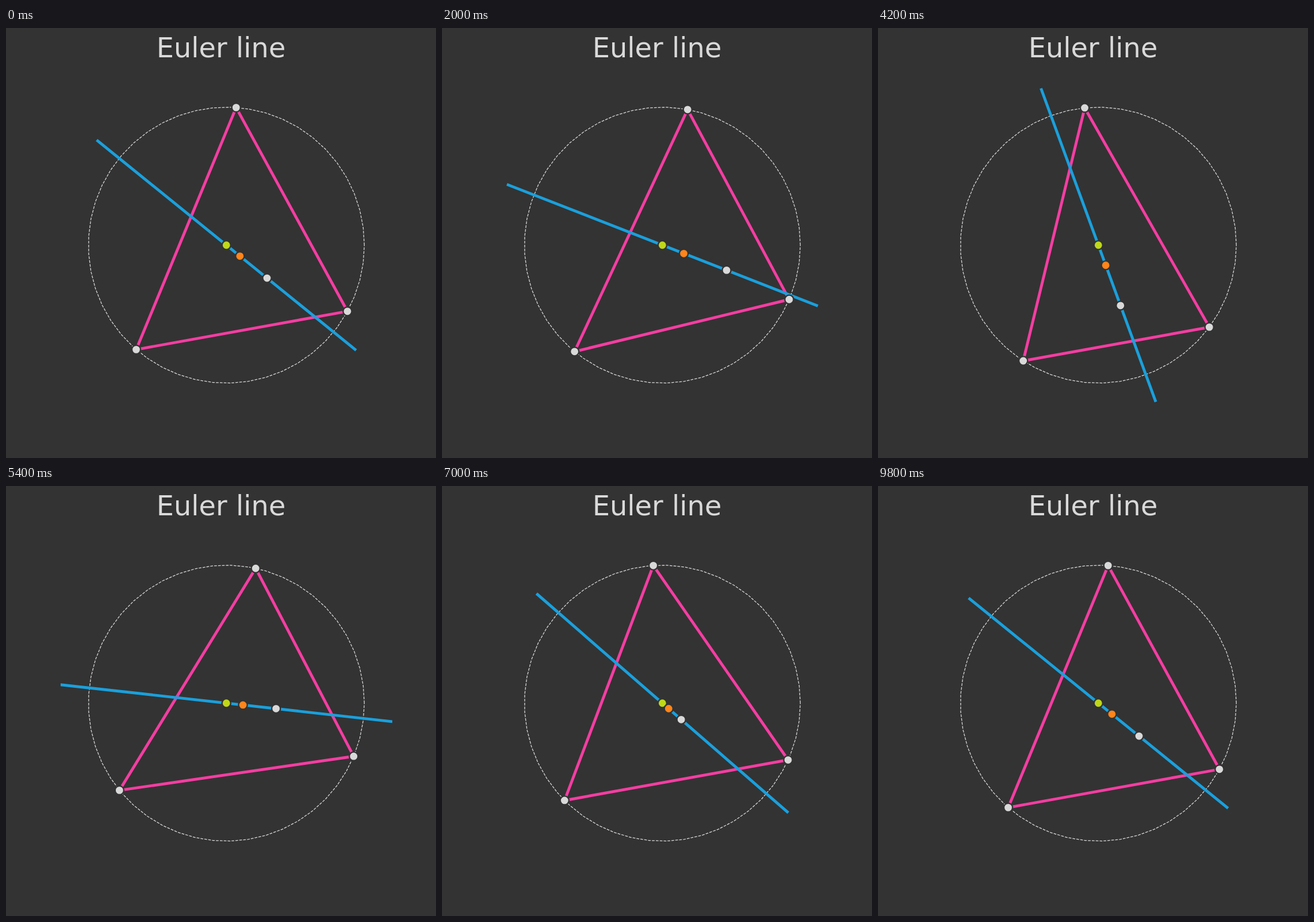
These frames come from a looping animation (748x748 px, 10000 ms). An HTML page:

```html
<!DOCTYPE html>
<html lang="en">
<head>
<meta charset="utf-8">
<title>Euler line</title>
<style>
  html, body { margin: 0; width: 100%; height: 100%; overflow: hidden; background: #333; }
  svg { display: block; width: 100vw; height: 100vh; }
  text { font: 47.9px "DejaVu Sans", sans-serif; fill: #d9d9d9; text-anchor: middle; }
  #circle { fill: none; stroke: #d9d9d9; stroke-width: 1.28; stroke-dasharray: 4.73 2.05; }
  #triangle { fill: none; stroke: #f53da2; stroke-width: 4.9; }
  #line { stroke: #1aa0dc; stroke-width: 4.9; stroke-linecap: square; }
  .dot { fill: #d9d9d9; stroke: #333; stroke-width: 2.4; }
  #circumcenter { fill: #bfd817; }
  #centroid { fill: #ff851b; }
</style>
</head>
<body>
<svg viewBox="0 0 748 748">
  <clipPath id="axes"><rect x="95" y="90" width="577" height="576"/></clipPath>
  <text x="374" y="51">Euler line</text>
  <polyline id="circle"/>
  <polygon id="triangle"/>
  <g clip-path="url(#axes)"><line id="line"/></g>
  <circle class="dot vertex" r="7.6"/>
  <circle class="dot vertex" r="7.6"/>
  <circle class="dot vertex" r="7.6"/>
  <circle class="dot" id="circumcenter" r="7.6"/>
  <circle class="dot" id="centroid" r="7.6"/>
  <circle class="dot" id="orthocenter" r="7.6"/>
</svg>
<script>
const CENTER = [383.35, 377.74], RADIUS = 239.98;
const STEPS = 50, STEP_MS = 200, TURN = 2 * Math.PI;
const SWING = Math.PI / 18, LINE_REACH = 1.2;
// Each vertex swings about its rest angle (radians) a whole number of times per loop.
const VERTICES = [
  { rest: 1.5, cycles: 3 },
  { rest: -0.5, cycles: 2 },
  { rest: 4, cycles: 5 },
];

const byId = id => document.getElementById(id);
const dots = document.querySelectorAll('.vertex');
const onCircle = angle => [Math.cos(angle), Math.sin(angle)];
const toStage = ([x, y]) => [CENTER[0] + RADIUS * x, CENTER[1] - RADIUS * y];
const scale = ([x, y], k) => [x * k, y * k];

function setPoints(el, points) {
  el.setAttribute('points', points.map(toStage).join(' '));
}

function moveDot(el, point) {
  const [x, y] = toStage(point);
  el.setAttribute('cx', x);
  el.setAttribute('cy', y);
}

function moveLine(el, from, to) {
  const [x1, y1] = toStage(from), [x2, y2] = toStage(to);
  Object.entries({ x1, y1, x2, y2 }).forEach(([name, value]) => el.setAttribute(name, value));
}

function draw(step) {
  const phase = TURN * step / (STEPS - 1);
  const points = VERTICES.map(v => onCircle(v.rest + SWING * Math.sin(v.cycles * phase)));
  const orthocenter = points.reduce((sum, p) => [sum[0] + p[0], sum[1] + p[1]]);
  const end = scale(orthocenter, LINE_REACH / Math.hypot(...orthocenter));

  setPoints(byId('triangle'), points);
  points.forEach((p, i) => moveDot(dots[i], p));
  moveLine(byId('line'), scale(end, -1), end);
  moveDot(byId('centroid'), scale(orthocenter, 1 / 3));
  moveDot(byId('orthocenter'), orthocenter);
}

function tick() {
  draw(Math.floor(performance.now() / STEP_MS) % STEPS);
  requestAnimationFrame(tick);
}

setPoints(byId('circle'),
  Array.from({ length: STEPS }, (_, i) => onCircle(TURN * i / (STEPS - 1))));
moveDot(byId('circumcenter'), [0, 0]);
tick();
</script>
</body>
</html>
```
